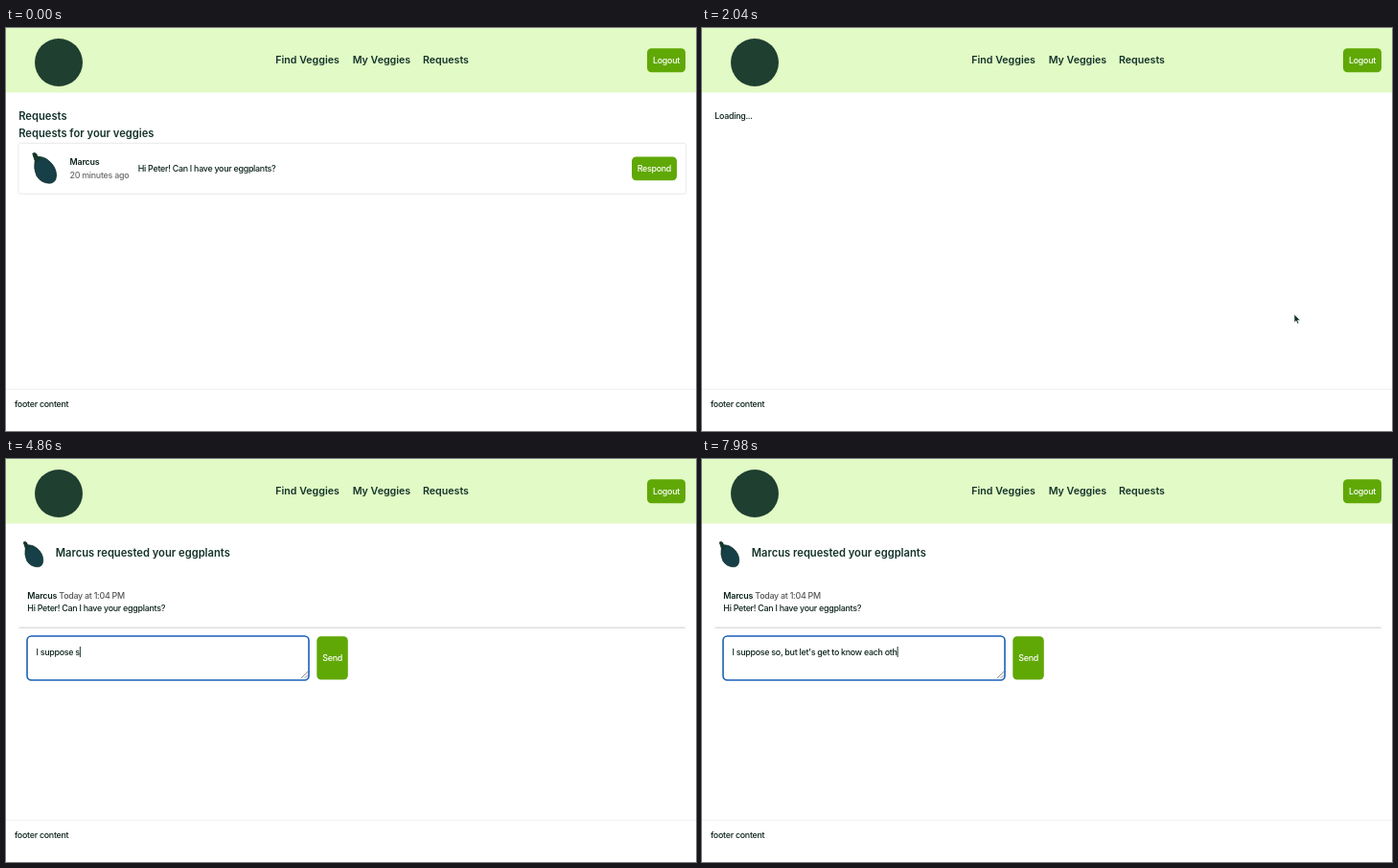
Recreate the animation shown at these times as an HTML page. Size 720 by 421 pixels, loop 8000 ms.

```html
<!DOCTYPE html>
<html lang="en">
<head>
<meta charset="utf-8">
<title>Veggie requests</title>
<style>
  html, body { margin: 0; height: 100%; overflow: hidden; background: #fff; }
  svg { display: block; width: 100%; height: 100%; }
  text { font: 500 8.87px Inter, Roboto, sans-serif; letter-spacing: -.03em; fill: #0b211b; white-space: pre; }
  .nav { font-size: 10.65px; font-weight: 600; letter-spacing: 0; fill: #14332b; }
  .title { font-size: 11.2px; font-weight: 600; letter-spacing: 0; fill: #14332b; }
  .name { font-weight: 600; letter-spacing: -.02em; }
  .muted { fill: #6b6b6b; }
  .label { fill: #fff; text-anchor: middle; }
  .button { fill: #60a806; }
  .button.hover { fill: #47800e; }
  .card { fill: #fff; filter: drop-shadow(0 .8px 1.1px rgba(0, 0, 0, .22)); }
  .url { font-size: 6.5px; letter-spacing: -.02em; fill: #fff; }
  .pointer { fill: #14332b; stroke: #fff; stroke-width: .6; stroke-linejoin: round; }
</style>
</head>
<body>
<svg viewBox="0 0 720 421">
  <defs>
    <g id="eggplant">
      <path d="M.8 1.2Q3 -.2 4.8 1.8L6 4.4Q13 4.4 17.5 8.5Q25.4 15 25.5 24Q25.2 32 18.5 32.2Q9.5 32 5 24.5Q1.6 17 3.2 8.5Z" fill="#173f48" stroke="#14332b" stroke-width=".9"/>
      <path d="M.8 1.2Q3 -.2 4.8 1.8L6 4.4L10 7L6.5 8.5L5 12L3 8.5Z" fill="#17382c"/>
    </g>
  </defs>

  <rect width="720" height="67.4" fill="#e2fac5"/>
  <circle cx="55" cy="36" r="25" fill="#1f3f31"/>
  <text class="nav" x="281.3" y="37.4">Find Veggies</text>
  <text class="nav" x="361.7" y="37.4">My Veggies</text>
  <text class="nav" x="435" y="37.4">Requests</text>
  <rect class="button" x="669" y="21.3" width="40" height="25" rx="4.5"/>
  <text class="label" x="689" y="37">Logout</text>

  <g id="list">
    <text class="title" x="13.2" y="95.6">Requests</text>
    <text class="title" x="13.2" y="113.5">Requests for your veggies</text>
    <rect class="card" x="13.3" y="121" width="695.6" height="51.8" rx="1"/>
    <use href="#eggplant" x="27" y="130"/>
    <text class="name" x="66.5" y="143.4">Marcus</text>
    <text class="muted" x="66.5" y="156.6">20 minutes ago</text>
    <text x="137.7" y="150.2">Hi Peter! Can I have your eggplants?</text>
    <rect id="respond" class="button" x="653" y="134.5" width="47" height="24.7" rx="4.5"/>
    <text class="label" x="676.4" y="150.2">Respond</text>
  </g>

  <text id="loading" x="13.3" y="94.9">Loading...</text>

  <g id="chat">
    <use href="#eggplant" transform="translate(17.6 86) scale(.83)"/>
    <text class="title" x="51.8" y="101.5">Marcus requested your eggplants</text>
    <text x="22.3" y="146.2"><tspan class="name">Marcus</tspan><tspan fill="#555"> Today at 1:04 PM</tspan></text>
    <text x="22.3" y="159.4">Hi Peter! Can I have your eggplants?</text>
    <rect x="13.3" y="175.6" width="695.6" height="1.2" fill="#d8d8da"/>
    <rect id="field" x="22" y="185" width="294" height="46" rx="4.5" fill="#fff"/>
    <path d="M308 229L315 222M311.5 229L315 225.5" stroke="#777" stroke-width=".8"/>
    <text id="hint" class="muted" x="31.5" y="204.7">Reply to Marcus</text>
    <text id="reply" x="31.5" y="204.7"></text>
    <rect id="caret" y="196" width=".9" height="11" fill="#0b211b"/>
    <rect class="button" x="324.3" y="185.2" width="32.5" height="45.3" rx="4.5"/>
    <text class="label" x="340.6" y="211.4">Send</text>
  </g>

  <rect y="376.8" width="720" height="1" fill="#f0f0f1"/>
  <text x="9" y="396.2">footer content</text>

  <g id="status">
    <path d="M0 412.7H216Q218 412.7 218 414.7V421H0Z" fill="#1f3a30"/>
    <text class="url" x=".8" y="420.4">https://crofture.herokuapp.com/requests/6317a73f9adeb6912df04552</text>
  </g>

  <g id="mouse">
    <path id="arrow" class="pointer" d="M0 0V8.6L2 6.9L3.4 10L4.9 9.3L3.5 6.4H6.2Z"/>
    <path id="hand" d="M-.9 .8Q0 -.5 .9 .8V3.6L4.6 4.6Q5.8 5 5.5 6.4L4.6 9.6H-.3L-3 6.2Q-3 4.8 -.9 6Z" fill="#fff" stroke="#14332b" stroke-width=".9"/>
    <path id="beam" d="M-2 -4.6Q0 -4.6 0 -3.6Q0 -4.6 2 -4.6M0 -3.6V3.6M-2 4.6Q0 4.6 0 3.6Q0 4.6 2 4.6" fill="none" stroke="#14332b" stroke-width="1.1"/>
  </g>
</svg>
<script>
  const LOOP = 8000, STEP = 60;
  const MESSAGE = "I suppose so, but let's get to know each other";
  const HOVER = 780, LOADING = 1320, CHAT = 2280, FOCUS = 3060, TYPING = 3760;

  // [time, x, y]
  const PATH = [[360, 590, 424], [840, 678, 150], [1740, 678, 150], [2040, 618, 299],
                [2280, 600, 304], [2940, 203, 209.5]];
  // [time, characters typed]
  const TYPED = [[TYPING, 1], [4840, 11], [6640, 29], [7960, 44]];

  const el = Object.fromEntries([...document.querySelectorAll("[id]")].map(e => [e.id, e]));
  const display = (e, on) => { e.style.display = on ? "" : "none"; };
  const linear = u => u;
  const smooth = u => u * u * (3 - 2 * u);

  function sample(keys, t, col, ease) {
    if (t <= keys[0][0]) return keys[0][col];
    const i = keys.findIndex(k => k[0] > t);
    if (i < 0) return keys[keys.length - 1][col];
    const a = keys[i - 1], b = keys[i];
    return a[col] + (b[col] - a[col]) * ease((t - a[0]) / (b[0] - a[0]));
  }

  function render(t) {
    const hovering = t >= HOVER && t < LOADING;
    const focused = t >= FOCUS, typing = t >= TYPING;
    display(el.list, t < LOADING);
    display(el.loading, t >= LOADING && t < CHAT);
    display(el.chat, t >= CHAT);
    display(el.status, t >= 900 && t < 1440);
    el.respond.classList.toggle("hover", hovering);

    const x = sample(PATH, t, 1, smooth), y = sample(PATH, t, 2, smooth);
    const overField = t >= CHAT && x > 22 && x < 316 && y > 185 && y < 231;
    display(el.mouse, t >= PATH[0][0] && !typing);
    el.mouse.setAttribute("transform", `translate(${x} ${y})`);
    display(el.hand, hovering);
    display(el.beam, overField);
    display(el.arrow, !hovering && !overField);

    el.field.setAttribute("stroke", focused ? "#1a5fb8" : "#8a8a8a");
    el.field.setAttribute("stroke-width", focused ? 1.6 : .7);
    display(el.hint, !typing);
    const count = typing ? Math.floor(sample(TYPED, t, 1, linear)) : 0;
    el.reply.textContent = MESSAGE.slice(0, count);
    const width = count ? el.reply.getComputedTextLength() : 0;
    el.caret.setAttribute("x", 31.5 + width);
    display(el.caret, typing || (focused && t < FOCUS + 500));
  }

  const start = performance.now();
  function tick() {
    const t = (performance.now() - start) % LOOP;
    render(Math.floor(t / STEP) * STEP);
    requestAnimationFrame(tick);
  }
  tick();
</script>
</body>
</html>
```
